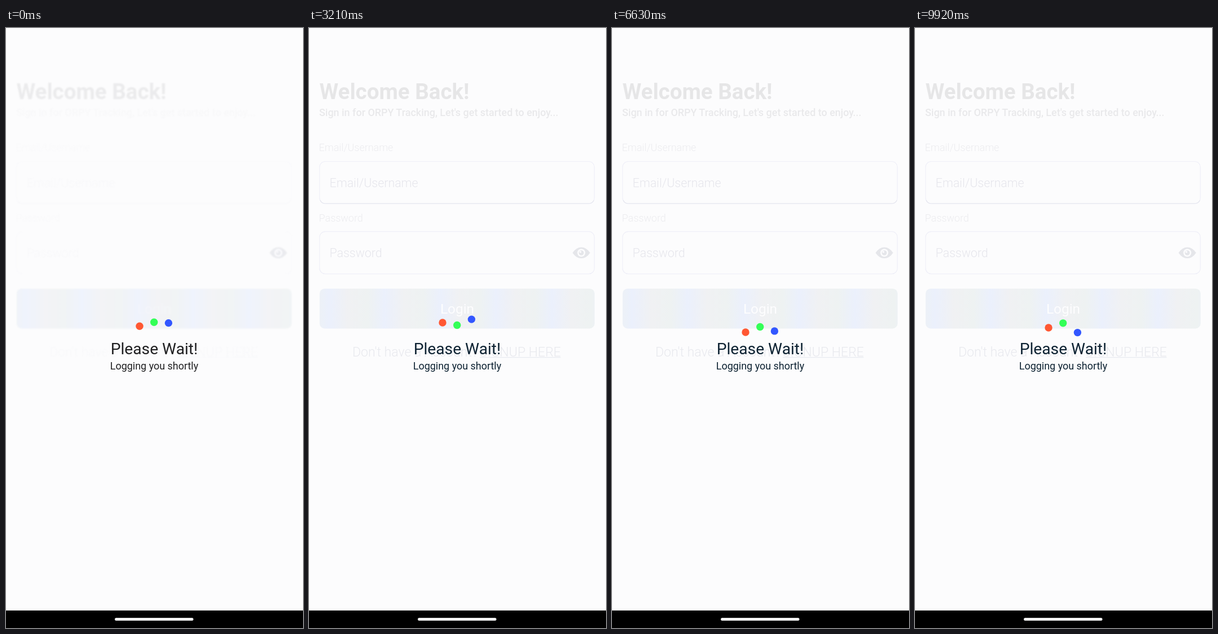
Recreate the animation shown at these times as an HTML page. Size 527x1063 px, loop 9960 ms.

```html
<!DOCTYPE html>
<html lang="en">
<head>
<meta charset="utf-8">
<title>Please Wait</title>
<style>
  html, body { margin: 0; width: 100%; height: 100%; overflow: hidden; background: #fcfcfd; }
  svg { display: block; width: 100vw; height: 100vh; }
  text { font-family: Roboto, sans-serif; white-space: pre; }
  .light { font-weight: 300; }
  .label { font-size: 17.95px; fill: #ececef; }
  .hint { font-size: 21.4px; fill: #e6e6ec; }
  .field { fill: none; stroke: #efeff8; stroke-width: 1.2; }
  .edge { fill: none; stroke: #e6e7ef; stroke-width: 1.2; }
  .signup { font-size: 23.08px; fill: #e8e9ee; }
</style>
</head>
<body>
<svg viewBox="0 0 527 1063">
  <defs>
    <linearGradient id="sheen" gradientUnits="userSpaceOnUse" x1="35" x2="134" spreadMethod="repeat">
      <stop offset="0" stop-color="#ebf0fc"/>
      <stop offset=".35" stop-color="#f0f1f3"/>
      <stop offset=".7" stop-color="#eef2f2"/>
      <stop offset="1" stop-color="#ebf0fc"/>
    </linearGradient>
  </defs>
  <rect width="527" height="1063" fill="#fcfcfd"/>

  <g id="form">
    <text x="18.5" y="126" font-size="38.5" font-weight="700" fill="#e6e6e7">Welcome Back!</text>
    <g class="detail">
      <text x="18" y="156" font-size="17.95" font-weight="500" fill="#e9e9eb">Sign in for ORPY Tracking, Let's get started to enjoy...</text>
      <text class="light label" x="17.6" y="218">Email/Username</text>
      <rect class="field" x="18.8" y="236.5" width="487.6" height="74.5" rx="10"/>
      <path class="edge" d="M20 305Q22 311 29 311H496Q503 311 505.5 305"/>
      <text class="light hint" x="36.5" y="281.5">Email/Username</text>
      <text class="light label" x="17.6" y="342.5">Password</text>
      <rect class="field" x="18.8" y="360.7" width="487.6" height="75" rx="10"/>
      <text class="light hint" x="36.5" y="406">Password</text>
    </g>
    <g transform="translate(483.2 398.3)">
      <path d="M-15.6 0Q-9-9.8 0-9.8T15.6 0Q9 9.8 0 9.8T-15.6 0Z" fill="#e5e6ea"/>
      <circle r="7" fill="#fcfcfd"/>
      <circle r="4.4" fill="#e5e6ea"/>
      <circle cx="-1.6" cy="-1.6" r="1.8" fill="#fcfcfd"/>
    </g>
    <rect x="18.8" y="461.7" width="488" height="70.8" rx="9" fill="url(#sheen)"/>
    <g class="detail">
      <text x="263" y="506" font-size="24.4" text-anchor="middle" fill="#fdfdfe">Login</text>
      <text class="light signup" x="77" y="581.5">Don't have a Account?</text>
      <text class="light signup" x="447" y="581.5" text-anchor="end">SIGNUP HERE</text>
      <path d="M303 583.7H446.5" stroke="#e8eaf0" stroke-width="1.3"/>
    </g>
  </g>

  <g id="message" text-anchor="middle">
    <text x="263" y="577.5" font-size="28.2">Please Wait!</text>
    <text x="263" y="604.8" font-size="17.95">Logging you shortly</text>
  </g>
  <g id="dots"></g>

  <rect y="1032" width="527" height="31" fill="#000"/>
  <rect x="193" y="1045" width="139.5" height="5" rx="2.5" fill="#f3f3f3"/>
</svg>
<script>
  const LOOP = 9960;
  // Each dot swings on its own period; lowest is a time at its lowest point.
  const dots = [
    { x: 237, color: '#ff5733', period: 1235, lowest: 7730 },
    { x: 262.7, color: '#33ff57', period: 1355, lowest: 7656 },
    { x: 288.4, color: '#3357ff', period: 1466, lowest: 5379 }
  ];
  const form = document.getElementById('form');
  const message = document.getElementById('message');
  const details = document.querySelectorAll('.detail');

  for (const dot of dots) {
    dot.node = document.createElementNS('http://www.w3.org/2000/svg', 'circle');
    dot.node.setAttribute('cx', dot.x);
    dot.node.setAttribute('r', 6.7);
    dot.node.setAttribute('fill', dot.color);
    document.getElementById('dots').append(dot.node);
  }

  const mix = (from, to, k) => from + (to - from) * k;

  function draw(time) {
    for (const { node, period, lowest } of dots) {
      node.setAttribute('cy', 529 + 13 * Math.cos(2 * Math.PI * (time - lowest) / period));
    }
    // The form starts faint and soft, then sharpens.
    const sharp = Math.min(1, time / 450);
    form.style.filter = sharp < 1 ? `blur(${mix(1.2, 0, sharp)}px)` : 'none';
    form.style.opacity = mix(0.75, 1, sharp);
    for (const detail of details) detail.style.opacity = mix(0.25, 1, sharp);
    message.setAttribute('fill', `rgb(${mix(32, 13, sharp)},${mix(32, 34, sharp)},${mix(34, 50, sharp)})`);
  }

  const start = performance.now();
  function tick() {
    draw((performance.now() - start) % LOOP);
    requestAnimationFrame(tick);
  }
  tick();
</script>
</body>
</html>
```
